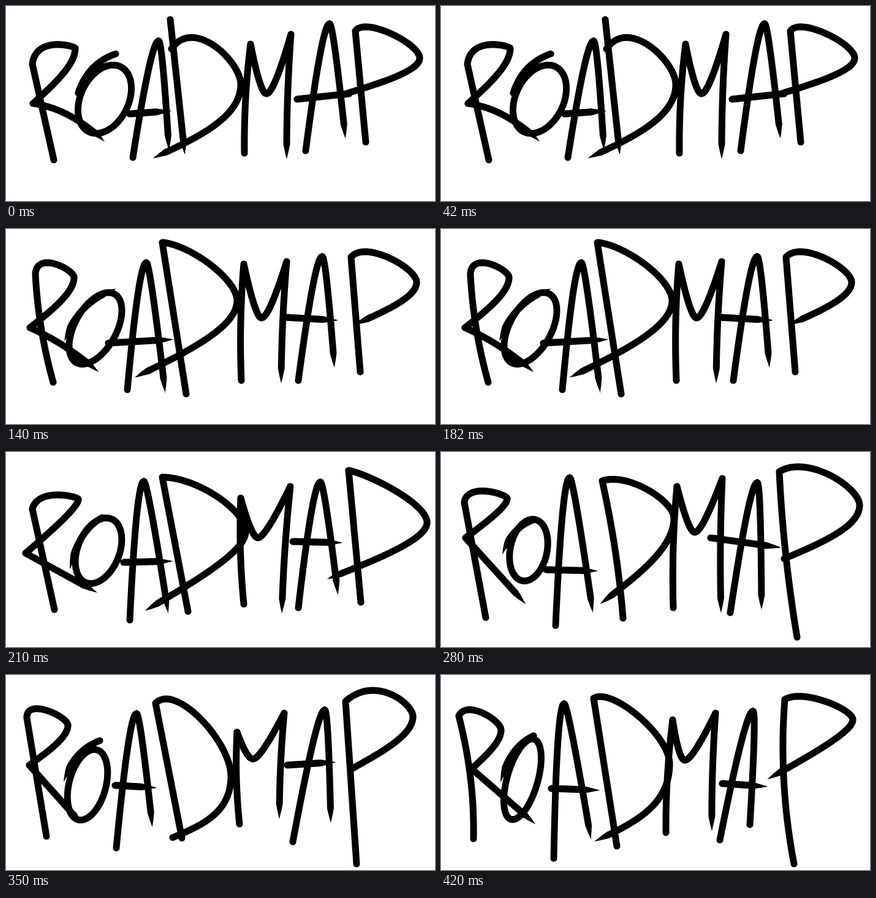
An HTML page with a canvas for the animation above (0.49 s loop, 700x318 px).

```html
<!DOCTYPE html>
<html lang="en">
<head>
<meta charset="utf-8">
<title>Roadmap</title>
<style>
html, body { margin: 0; width: 100%; height: 100%; overflow: hidden; background: #fff; }
canvas { display: block; }
</style>
</head>
<body>
<canvas id="stage" width="700" height="318"></canvas>
<script>
const ctx = document.getElementById('stage').getContext('2d');
const HOLD = 70, RADIUS = 5.6, TAPER = 26, STEPS = 120;

const mix = (a, b, t) => ({ x: a.x + (b.x - a.x) * t, y: a.y + (b.y - a.y) * t });
const shift = (p, dx, dy = 0) => ({ x: p.x + dx, y: p.y + dy });
const bezier = (pts, t) => pts.length === 1 ? pts[0]
  : bezier(pts.slice(1).map((p, i) => mix(pts[i], p, t)), t);

// Key points such as "12,34"; a trailing ">" marks a tapered end.
const points = text => text.split(' ').map(token => {
  const [x, y] = token.split(',').map(parseFloat);
  return { x, y, tip: token.endsWith('>') };
});

// One drawing of the word, built from letters given by their key points.
class Pose {
  ink = new Path2D();

  // A round brush that thins out towards tapered ends.
  brush(at, tips = []) {
    for (let i = 0; i <= STEPS; i++) {
      const { x, y } = at(i / STEPS);
      const reach = Math.min(TAPER, ...tips.map(p => Math.hypot(p.x - x, p.y - y)));
      const r = RADIUS * reach / TAPER;
      this.ink.moveTo(x + r, y);
      this.ink.arc(x, y, r, 0, 2 * Math.PI);
    }
  }

  curve(...pts) {
    this.brush(t => bezier(pts, t), [pts[0], pts.at(-1)].filter(p => p.tip));
  }

  // A line whose middle is pushed aside by dx, dy.
  arc(a, b, dx = 0, dy = 0) {
    this.curve(a, shift(mix(a, b, .5), 2 * dx, 2 * dy), b);
  }

  // Over the shoulder to the rightmost edge, then back to the tail.
  bowl(start, shoulder, edge, tail, full) {
    const above = { x: edge.x, y: edge.y + (shoulder.y - edge.y) * .6 };
    const below = { x: edge.x, y: edge.y + (tail.y - edge.y) * full };
    const solve = k => (8 * shoulder[k] - start[k] - 3 * above[k] - edge[k]) / 3;
    this.curve(start, { x: solve('x'), y: solve('y') }, above, edge);
    this.curve(edge, below, mix(tail, below, .5), tail);
  }

  // D and P: top, foot, shoulder, edge, tail, start of the bowl.
  D(text, { full = .35, bow = 0 } = {}) {
    const [top, foot, shoulder, edge, tail, start = { ...top, tip: false }] = points(text);
    this.arc(top, foot, bow);
    this.bowl(start, shoulder, edge, tail, full);
    return this;
  }

  // Top, foot, shoulder, edge, waist, end of the leg.
  R(text, { full = .3, bow = 0, lift = 0 } = {}) {
    const [top, foot, shoulder, edge, waist, leg] = points(text);
    this.arc(top, foot, bow);
    this.bowl(top, shoulder, edge, waist, full);
    this.arc(waist, leg, 0, -lift);
    return this;
  }

  // A tilted ellipse with a curl from its top down the left side.
  O(cx, cy, rx, ry, degrees, curl) {
    const tilt = degrees * Math.PI / 180, cos = Math.cos(tilt), sin = Math.sin(tilt);
    this.brush(t => {
      const u = rx * Math.cos(t * 2 * Math.PI), v = ry * Math.sin(t * 2 * Math.PI);
      return { x: cx + u * cos - v * sin, y: cy + u * sin + v * cos };
    });
    const [from, to] = points(curl);
    this.curve(from, mix(mix(from, to, .5), { x: to.x, y: from.y }, .5), to);
    return this;
  }

  // Foot, apex, right end, both ends of the bar.
  A(text) {
    const [foot, apex, end, left, right] = points(text);
    const leg = (p, side) => this.curve(p, shift(mix(p, apex, .5), side * 6), shift(apex, side * 10), apex);
    leg(foot, -1);
    leg(end, .5);
    this.arc(left, right);
    return this;
  }

  // Foot, first peak, valley, second peak, end.
  M(text) {
    const [foot, peak, valley, peak2, end] = points(text);
    this.arc(foot, peak, -3);
    this.curve(peak, shift(valley, -10), valley);
    this.curve(valley, shift(valley, 12), peak2);
    this.arc(peak2, end, -2);
    return this;
  }
}

const poses = [
  new Pose()
    .R('43,95 78,251 80,63 113,69 44,159 162,222>', { lift: 12 })
    .O(161, 152, 39, 59, 26, '179,78 118,142')
    .A('207,247 249,57 266,237> 202,176 271,171>')
    .D('268,22 292,244> 340,65 383,128 238,249> 270,70', { full: .45 })
    .M('389,240 399,62 425,143 465,46 458,251>')
    .A('489,236 528,29 554,218> 475,152 560,143')
    .D('570,41 587,222 628,45 675,85 548,145'),
  new Pose()
    .R('39,92 78,253 80,57 106,66 33,150 138,208')
    .O(150, 158, 32, 72, 29, '170,77 108,144>')
    .A('204,246 232,47 259,262> 194,175 260,180>')
    .D('265,32> 293,238 320,70 368,138 237,229> 226,95', { full: .5 })
    .M('385,236 391,47 414,142 467,47 456,252>')
    .A('480,231 522,23 545,229> 439,143> 572,134>')
    .D('558,17 581,234 625,35 667,80 548,153'),
  new Pose()
    .R('48,74 77,250 80,57 111,79 39,161 152,234>', { bow: -5, lift: 6 })
    .O(146, 162, 34, 64, 29, '181,97> 95,184>')
    .A('198,262 229,55 260,269> 167,186 274,180>')
    .D('255,22 294,269 332,57 377,117 208,243>')
    .M('384,247 388,57 417,145 458,53 449,253>')
    .A('477,247 516,45 536,228> 454,144 543,149>')
    .D('563,46 578,233 625,47 670,87 566,157>'),
  new Pose()
    .R('43,93 79,257 84,70 118,77 32,165 150,230>', { full: .15 })
    .O(151, 161, 34, 56, 22, '157,107 104,192>')
    .A('202,274 225,48 265,265> 192,180 273,178>')
    .D('255,41 297,260 345,73 391,130 225,260>', { full: .25 })
    .M('388,248 383,75 411,140 464,56 450,265>')
    .A('477,254 513,49 542,235> 468,146 550,148>')
    .D('559,30 579,245 635,63 687,115 522,208>', { full: .3 }),
  new Pose()
    .R('38,82 73,270 75,64 108,76 40,140 139,249>', { full: .2 })
    .O(143, 160, 30, 51, 12, '150,111 100,168>')
    .A('187,283 210,42 248,264> 172,192 257,194>')
    .D('263,47 297,271 338,62 380,108 258,249>', { bow: 4 })
    .M('379,254 385,56 414,131 459,43 457,264>')
    .A('472,262 516,50 523,259> 440,140 556,156>')
    .D('552,32 581,302 635,38 683,87 560,174', { full: .4, bow: -4 }),
  new Pose()
    .R('34,70 66,263 67,58 101,82 38,147 112,230')
    .O(133, 179, 30, 59, 15, '153,107 94,175>')
    .A('180,282 213,63 239,250> 178,180 247,184>')
    .D('244,46 287,266 318,72 367,165 272,265', { full: .6 })
    .M('381,243 377,93 403,137 454,62 446,236>')
    .A('468,272 520,57 530,243> 459,147 539,142>')
    .D('554,43 572,308 627,31 664,68 566,152'),
  new Pose()
    .R('29,67 53,267 68,62 98,90 50,153 155,244>', { bow: 7 })
    .O(133, 170, 25, 68, 16, '151,99 97,176>')
    .A('184,299 201,47 245,270> 180,185 260,188>')
    .D('249,38 287,279 322,67 373,145 249,272>', { full: .55 })
    .M('367,257 378,73 398,139 448,62 442,256>')
    .A('455,269 509,59 504,244 459,177 534,182>')
    .D('561,40 576,308 627,43 672,73 531,171>', { full: .2, bow: -9 }),
];

let shown;
function draw() {
  const pose = poses[Math.floor(performance.now() / HOLD) % poses.length];
  if (pose !== shown) {
    ctx.clearRect(0, 0, 700, 318);
    ctx.fill(pose.ink);
    shown = pose;
  }
  requestAnimationFrame(draw);
}
draw();
</script>
</body>
</html>
```
